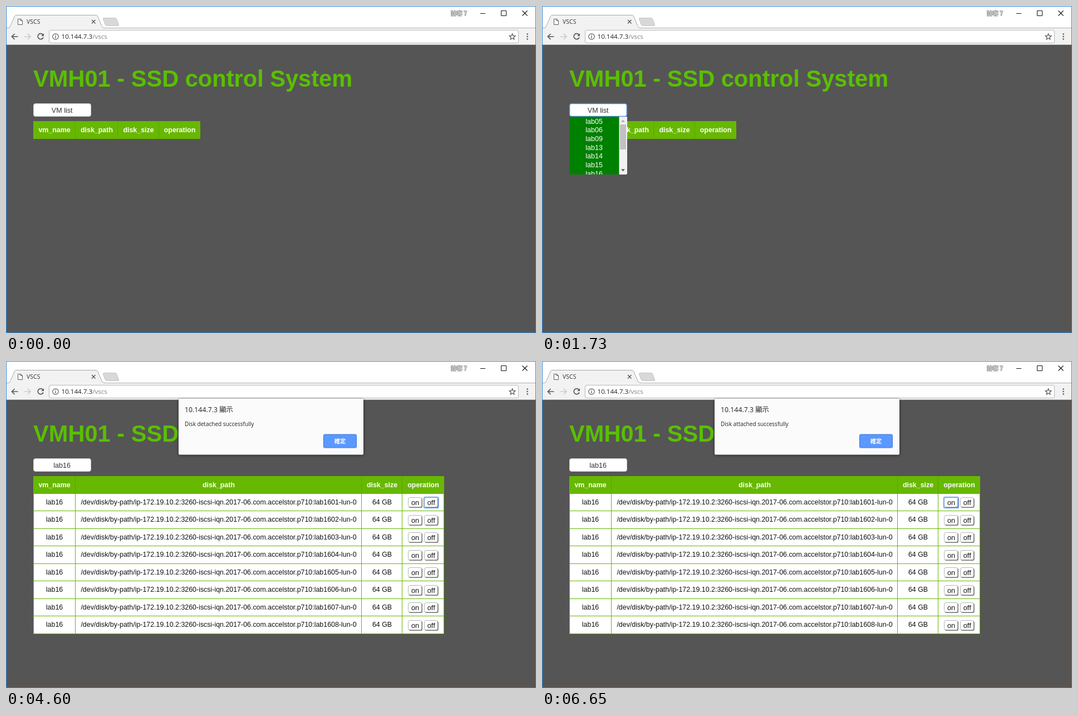
Recreate the animation shown at these times as an HTML page with a canvas. Size 952 px wide and 588 px high, loop 8 s.

```html
<!DOCTYPE html>
<html lang="zh-Hant">
<head>
<meta charset="utf-8">
<title>VSCS</title>
<style>
html, body { margin: 0; width: 100%; height: 100%; overflow: hidden; background: #555; }
canvas { display: block; }
</style>
</head>
<body>
<canvas id="stage" width="952" height="588"></canvas>
<script>
const ctx = document.getElementById('stage').getContext('2d');
const ARIAL = '"Liberation Sans", Arial, sans-serif';
const UI = '"Open Sans", "Noto Sans CJK TC", "Noto Sans CJK", sans-serif';
const CJK = '"Noto Sans CJK TC", "Noto Sans CJK", sans-serif';
const GREEN = '#67b800';
const LOOP = 8000;

function rect(x, y, w, h, color) {
  ctx.fillStyle = color;
  ctx.fillRect(x, y, w, h);
}

function box(x, y, w, h, r, fill, stroke, width = 1) {
  ctx.beginPath();
  ctx.roundRect(x, y, w, h, r);
  if (fill) { ctx.fillStyle = fill; ctx.fill(); }
  if (stroke) { ctx.strokeStyle = stroke; ctx.lineWidth = width; ctx.stroke(); }
}

function path(d, stroke, width = 1, fill) {
  const p = new Path2D(d);
  if (fill) { ctx.fillStyle = fill; ctx.fill(p); }
  if (stroke) { ctx.strokeStyle = stroke; ctx.lineWidth = width; ctx.stroke(p); }
}

function circle(x, y, r, fill, stroke, width) {
  box(x - r, y - r, 2 * r, 2 * r, r, fill, stroke, width);
}

function text(s, x, y, font, color, align = 'left') {
  ctx.font = font;
  ctx.fillStyle = color;
  ctx.textAlign = align;
  ctx.fillText(s, x, y);
}

function drawTabs() {
  rect(0, 0, 952, 40, '#fff');
  rect(0, 39, 952, 1, '#aeaeae');
  rect(0, 40, 952, 29, '#f2f2f2');
  rect(0, 69, 952, 1, '#bdbdbd');
  path('M4 39.5Q7 39 8 36L15 19Q16.2 16.5 19 16.5H161Q164 16.5 165 19L172 36Q173 39 177 39.5V41H4Z', null, 1, '#f2f2f2');
  path('M4 39.5Q7 39 8 36L15 19Q16.2 16.5 19 16.5H161Q164 16.5 165 19L172 36Q173 39 177 39.5', '#a8a8a8');
  path('M176 21.5H195Q198 21.5 199 24L202.5 33.5Q203 35.5 201 35.5H181Q179 35.5 178 33L174.5 24Q174 21.5 176 21.5Z', '#c4c4c4', 1, '#d8d8d8');
  path('M21.5 23.5H26.5L29.5 26.5V33.5H21.5ZM26.5 23.5V26.5H29.5', '#5a5a5a', 1, '#fff');
  text('VSCS', 37, 32, '10.5px ' + UI, '#333');
  path('M154 25L160.5 31.5M160.5 25L154 31.5', '#555', 1.4);
}

function drawWindowButtons() {
  ctx.font = '10.5px ' + CJK;
  ctx.textAlign = 'left';
  ctx.lineJoin = 'round';
  ctx.lineWidth = 1.6;
  ctx.strokeStyle = '#8c8c8c';
  ctx.strokeText('訪客 7', 799, 17);
  ctx.lineJoin = 'miter';
  text('訪客 7', 799, 17, '10.5px ' + CJK, '#eee');
  path('M852 13.5H861M889.5 8.5H898.5V17.5H889.5Z', '#111');
  path('M927.5 8.5L936.5 17.5M936.5 8.5L927.5 17.5', '#111', 1.1);
}

function drawToolbar() {
  path('M21.5 55H11M15.5 50L10.5 55L15.5 60', '#555', 1.7);
  path('M33 55H43.5M39 50L44 55L39 60', '#ccc', 1.7);
  path('M66.3 51.8A5 5 0 1 0 67 56.2', '#555', 1.7);
  path('M68 49.3V54H63.3Z', null, 1, '#555');
  box(77.5, 43.5, 843, 23, 2.5, '#fff', '#b8b8b8');
  circle(89, 55, 5.2, null, '#5a5a5a', 1.2);
  rect(88.4, 54, 1.3, 4, '#5a5a5a');
  rect(88.4, 51.7, 1.3, 1.3, '#5a5a5a');
  const font = '11.6px ' + UI;
  text('10.144.7.3', 99.5, 59, font, '#222');
  const hostWidth = ctx.measureText('10.144.7.3').width;
  text('/vscs', 99.5 + hostWidth, 59, font, '#808080');

  ctx.beginPath();
  for (let i = 0; i < 10; i++) {
    const a = i * Math.PI / 5 - Math.PI / 2, r = i % 2 ? 2.5 : 5.6;
    ctx.lineTo(909.5 + r * Math.cos(a), 55.4 + r * Math.sin(a));
  }
  ctx.closePath();
  ctx.strokeStyle = '#555';
  ctx.lineWidth = 1.2;
  ctx.stroke();
  for (const y of [50.5, 55, 59.5]) circle(936.5, y, 1.3, '#555');
}

function drawSelect(label, focused) {
  box(49.5, 175.5, 103, 23, 3.5, '#fff', focused ? '#4a86dc' : '#ccc', focused ? 1.6 : 1);
  text(label, 100.7, 191.5, '12.6px ' + ARIAL, '#333', 'center');
}

function drawHeader(cols) {
  rect(49, 207, cols[4] - 49, 32, GREEN);
  ['vm_name', 'disk_path', 'disk_size', 'operation'].forEach((name, i) => {
    if (i) rect(Math.floor(cols[i]) - 1, 208, 1, 30, '#5ca600');
    text(name, (cols[i] + cols[i + 1]) / 2, 227, 'bold 12.42px ' + ARIAL, '#fff', 'center');
  });
}

function drawButton(label, x, y, w, focused) {
  box(x + 1, y + 1, w - 1, 18, 3.5, '#777');
  box(x + .5, y + .5, w - 1.5, 17.5, 3.5, '#fff', '#b5b5b5');
  path(`M${x + 3} ${y + 18.2}H${x + w - 3}Q${x + w - .8} ${y + 18.2} ${x + w - .8} ${y + 16}V${y + 3}`, '#777', 1.4);
  if (focused) box(x - .3, y - .3, w + .6, 19.6, 2, null, '#6c9df0', 1.6);
  text(label, x + w / 2, y + 14, '12.6px ' + ARIAL, '#111', 'center');
}

function drawRows(cols, focus) {
  const font = '12.42px ' + ARIAL;
  rect(49, 239, 738, 252, '#fff');
  for (let i = 0; i < 8; i++) {
    const y = Math.floor(238 + 31.5 * i), base = y + 20;
    text('lab16', 87, base, font, '#111', 'center');
    text(`/dev/disk/by-path/ip-172.19.10.2:3260-iscsi-iqn.2017-06.com.accelstor.p710:lab160${i + 1}-lun-0`,
      382, base, font, '#111', 'center');
    text('64 GB', 675.5, base, font, '#111', 'center');
    const top = Math.round(245 + 31.5 * i);
    drawButton('on', 722, top, 26, !i && focus === 'on');
    drawButton('off', 751, top, 25.5, !i && focus === 'off');
    rect(49, Math.floor(269.5 + 31.5 * i), 738, 1, GREEN);
  }
  for (const x of cols) rect(x === 49 ? x : x - 1, 239, 1, 252, GREEN);
}

function drawDropdown() {
  ctx.save();
  ctx.beginPath();
  ctx.roundRect(49, 199, 104, 104, [0, 0, 2, 2]);
  ctx.clip();
  rect(49, 199, 104, 104, '#008000');
  ['05', '06', '09', '13', '14', '15', '16'].forEach((n, i) =>
    text('lab' + n, 93.7, 211.5 + 15.7 * i, '12.6px ' + ARIAL, '#fff', 'center'));
  rect(138.5, 199, 14.5, 104, '#f1f1f1');
  rect(140, 213, 11, 45, '#c1c1c1');
  path('M142 208.5H149L145.5 205Z', null, 1, '#a3a3a3');
  path('M142 293.5H149L145.5 297Z', null, 1, '#444');
  ctx.restore();
}

function drawAlert(message) {
  ctx.save();
  ctx.shadowColor = 'rgba(0,0,0,.55)';
  ctx.shadowBlur = 5;
  ctx.shadowOffsetY = 1;
  box(310, 68, 332, 100.5, 2, '#fbfbfb');
  ctx.restore();
  text('10.144.7.3 顯示', 321, 92, '12.3px ' + UI, '#222');
  text(message, 321, 117, '10.05px ' + UI, '#222');
  box(570.5, 132, 59, 24, 2, '#5b98ff', '#3d78d8');
  text('確定', 600, 148, 'bold 10.3px ' + CJK, '#fff', 'center');
}

function draw(t) {
  const step = [500, 2550, 4600, 6650].filter(c => t >= c).length;
  const listed = step > 1;
  const cols = listed ? [49, 125, 639, 712, 787] : [49, 125, 201, 275, 349];

  rect(0, 0, 952, 588, '#555');
  text('VMH01 - SSD control System', 49, 145, 'bold 41.6px ' + ARIAL, '#5abf00');
  drawHeader(cols);
  if (listed) drawRows(cols, ['', 'off', 'on'][step - 2]);
  drawSelect(listed ? 'lab16' : 'VM list', step === 1);
  if (step === 1) drawDropdown();

  drawTabs();
  drawWindowButtons();
  drawToolbar();
  if (step > 2) drawAlert(`Disk ${step === 3 ? 'detached' : 'attached'} successfully`);
  box(.5, .5, 951, 587, 0, null, '#2d8ad6');
}

const start = performance.now();
function tick() {
  draw((performance.now() - start) % LOOP);
  requestAnimationFrame(tick);
}
tick();
</script>
</body>
</html>
```
